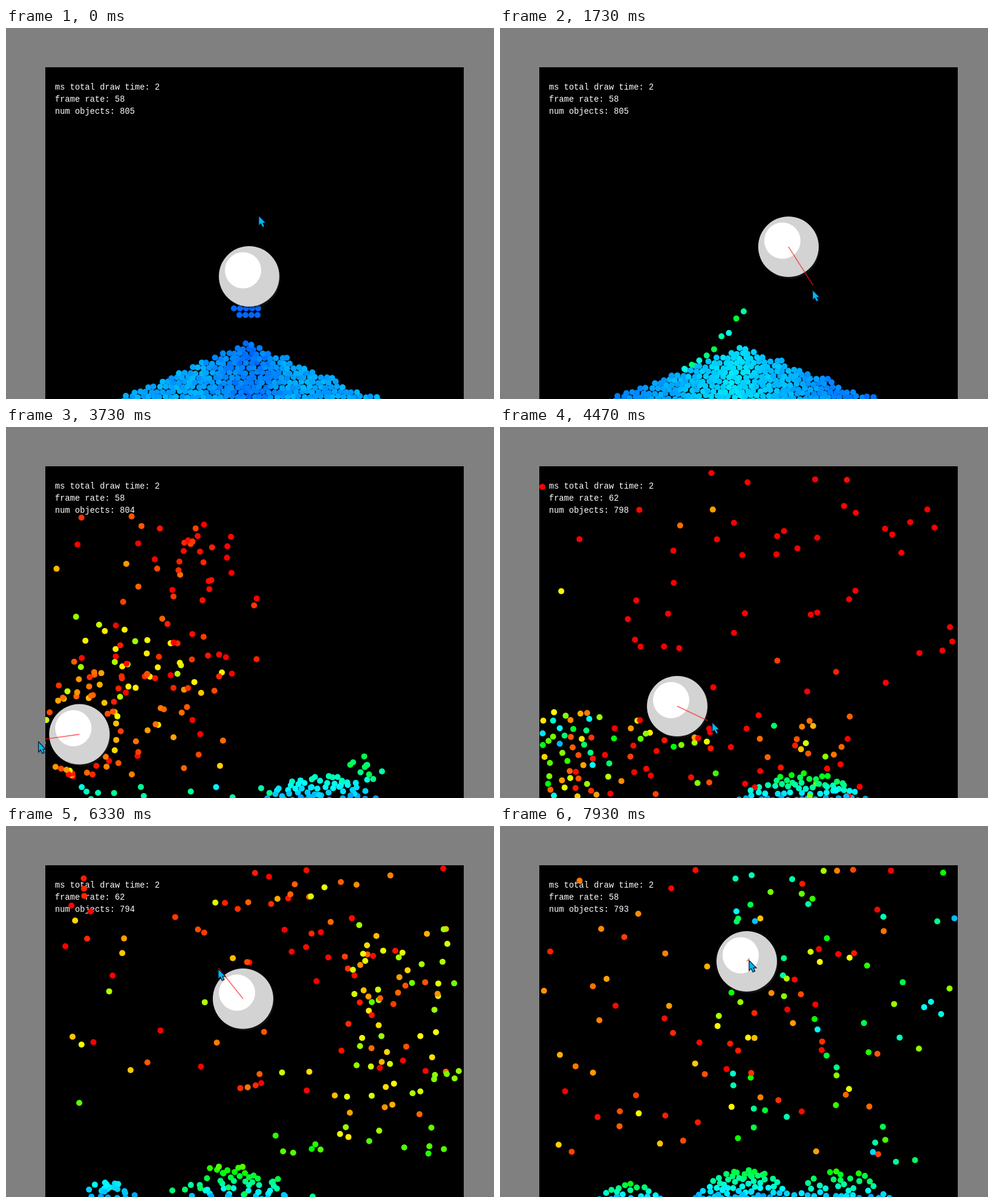
Write an HTML page with a canvas that moves like this. It is 807 by 614 pixels and loops after 8 s.

```html
<!DOCTYPE html>
<html lang="en">
<head>
<meta charset="utf-8">
<title>Particle pile</title>
<style>
  html, body { margin: 0; width: 100%; height: 100%; overflow: hidden; background: #808080; }
  #world { position: absolute; left: 65px; top: 65px; width: 692px; height: 549px; background: #000; }
  #stats { position: absolute; left: 81px; top: 89px; margin: 0; color: #fff;
           font: 13.75px/20px "Liberation Mono", monospace; }
  canvas { position: absolute; left: 0; top: 0; }
</style>
</head>
<body>
<div id="world"></div>
<pre id="stats"></pre>
<canvas id="view" width="807" height="614"></canvas>
<script>
const TICKS = 120, LOOP = 8000, COUNT = 370, DROPS = 9, GRAVITY = 1.2;
const LEFT = 70, RIGHT = 752, TOP = 70, FLOOR = 618;
const ctx = document.getElementById('view').getContext('2d');
const stats = document.getElementById('stats');

let seed = 7;
function rnd() {
  seed = (seed + 0x6D2B79F5) | 0;
  let v = Math.imul(seed ^ (seed >>> 15), 1 | seed);
  v = (v + Math.imul(v ^ (v >>> 7), 61 | v)) ^ v;
  return ((v ^ (v >>> 14)) >>> 0) / 4294967296;
}
const mix = (a, b, u) => a + (b - a) * u;
const within = (a, b) => mix(a, b, rnd());
const repeat = (n, make) => Array.from({ length: n }, (_, i) => make(i));

// Groups of dots: {x, y, h: hue, rest: lying on the floor}
function spread(n, gap, pick) {
  const dots = [];
  while (dots.length < n) {
    let dot, tries = 0;
    do dot = pick();
    while (++tries < 30 && dots.some(d => Math.hypot(d.x - dot.x, d.y - dot.y) < gap));
    dots.push(dot);
  }
  return dots;
}

const air = (n, x0, x1, y0, y1, h0, h1, skew = 1) => spread(n, 10, () => (
  { x: within(x0, x1), y: within(y0, y1), h: mix(h0, h1, rnd() ** skew), rest: false }));

const mound = (n, mid, half, height, topHue) => spread(n, 8.5, () => {
  const side = rnd() + rnd() - 1, lift = rnd() * (1 - side * side);
  return { x: mid + half * side, y: FLOOR - height * lift,
           h: mix(205, topHue, lift) + within(-6, 6), rest: true };
});

// Dots thrown up around the ball, cooling towards the right
const fan = (n, cx, cy, reach) => spread(n, 7.5, () => {
  const a = within(0.99, 1.73) * Math.PI, r = reach * Math.sqrt(within(0.04, 1));
  const x = cx + r * Math.cos(a), y = cy + r * Math.sin(a);
  return { x, y, h: Math.min(160, Math.max(0, (x - cx) * 1.9 + within(-15, 15))), rest: false };
});

const fill = dots => [...dots, ...repeat(COUNT - dots.length, () => (
  { x: within(LEFT, RIGHT), y: within(635, 690), h: 210, rest: true }))];

const slope = x => 522 + 0.42 * Math.abs(x - 400);
const cone = [];
for (let y = FLOOR, row = 0; y > 515; y -= 7.9, row++) {
  for (let x = 185 + (row % 2) * 4.6; x < 622; x += 9.2) {
    if (y < slope(x) + within(-4, 4)) continue;
    const h = 213 - 12 * Math.min(1, Math.abs(x - 400) / 80) + within(-5, 5);
    cone.push({ x: x + within(-1.5, 1.5), y: y + within(-1.5, 1.5), h, rest: true });
  }
}

// The cone slumps a little and lights up in the middle
const slump = (dot, u) => {
  const off = Math.min(1, Math.abs(dot.x - 385) / 190);
  return { ...dot, x: mix(400, dot.x, 1 + 0.02 * u), y: dot.y + 8 * u * (1 - off),
           h: mix(dot.h, 187 + 24 * off + within(-4, 4), u) };
};
const under = i => ({ x: 377 + 10 * (i % 5) + (i > 4 ? 9 : 0), y: i > 4 ? 475 : 464, h: 216 });
const bounced = i => {
  const u = i / (DROPS - 1), x = mix(305, 403, u);
  return { x, y: slope(x) - 55 * u * u + within(-5, 5), h: within(125, 178) };
};
const base = fill(cone.slice(0, COUNT - DROPS)).slice(0, COUNT - DROPS);
const start = (t, u, drop) => (
  { t, dots: [...base.map(d => slump(d, u)), ...repeat(DROPS, i => ({ rest: false, ...drop(i) }))] });

const keys = [
  start(0, 0, under),
  start(10, 0.4, i => ({ x: under(i).x, y: 542, h: 195 })),
  start(26, 1, bounced)];

// Each new place is taken by a dot that is near, with some chance
function regroup(t, ease, ...groups) {
  const from = keys[keys.length - 1].dots;
  const free = new Set(from.keys()), dots = [];
  for (const place of fill(groups.flat())) {
    let best, least = Infinity;
    for (const i of free) {
      const d = from[i];
      const cost = Math.hypot(place.x - d.x, 2 * (place.y - d.y))
        + (place.rest === d.rest ? 0 : 200) + (place.rest ? 20 : 200) * rnd();
      if (cost < least) { least = cost; best = i; }
    }
    free.delete(best);
    dots[best] = place;
  }
  keys.push({ t, ease, dots });
}

// The ball dives into the cone, then sweeps left, right and up
regroup(43, 3, mound(95, 553, 105, 52, 186), fan(190, 287, 597, 117),
  air(4, 380, 520, 450, 555, 120, 170));
regroup(52, 1, mound(70, 540, 110, 42, 175), air(160, LEFT, 300, 200, 610, 0, 40, 3));
regroup(67, 1, mound(65, 505, 115, 45, 120), air(45, LEFT, 155, 470, 614, 0, 200),
  air(50, LEFT, RIGHT, TOP, 440, 0, 60, 12), air(65, 150, 610, 475, 612, 0, 150, 3));
regroup(83, 1, mound(42, 132, 75, 24, 165), mound(60, 400, 95, 85, 60),
  air(75, 670, RIGHT, 320, 612, 0, 40, 8), air(60, LEFT, RIGHT, TOP, 520, 0, 150, 4),
  air(25, 490, RIGHT, 540, 612, 0, 60, 4));
regroup(108, 1, mound(22, 185, 65, 48, 180), mound(60, 362, 105, 52, 90),
  air(85, LEFT, RIGHT, TOP, 520, 0, 50, 4), air(65, 440, RIGHT, 80, 612, 45, 205));
regroup(119, 1, mound(70, 405, 85, 50, 130), mound(20, 215, 55, 28, 120),
  mound(36, 565, 90, 48, 110), air(70, LEFT, 650, TOP, 580, 0, 70, 2),
  air(60, 360, RIGHT, TOP, 560, 50, 205));

// tick, ball x y, pointer x y
const track = [
  [0, 402, 411, 418, 311], [14, 440, 365, 485, 325], [26, 477, 362, 517, 434],
  [35, 440, 535, 430, 600], [43, 287, 597, 250, 601], [54, 115, 520, 34, 530],
  [67, 293, 462, 351, 489], [77, 585, 490, 600, 455], [83, 563, 459, 450, 386],
  [96, 385, 275, 350, 230], [108, 424, 208, 442, 232], [119, 408, 224, 412, 223]];

const findSegment = (list, t, timeOf) => {
  let i = 0;
  while (i < list.length - 2 && timeOf(list[i + 1]) <= t) i++;
  return i;
};

// Smooth curve through the rows
function follow(t) {
  const i = findSegment(track, t, row => row[0]);
  const a = track[i], b = track[i + 1];
  const before = track[i - 1] || a, after = track[i + 2] || b;
  const span = b[0] - a[0], u = (t - a[0]) / span;
  return a.map((v, c) => {
    const m0 = (b[c] - before[c]) / (b[0] - before[0]) * span;
    const m1 = (after[c] - a[c]) / (after[0] - a[0]) * span;
    return (2 * u ** 3 - 3 * u * u + 1) * v + (u ** 3 - 2 * u * u + u) * m0
      + (3 * u * u - 2 * u ** 3) * b[c] + (u ** 3 - u * u) * m1;
  }).slice(1);
}

function disc(x, y, r, color) {
  ctx.fillStyle = color;
  ctx.beginPath();
  ctx.arc(x, y, r, 0, 2 * Math.PI);
  ctx.fill();
}

function drawDots(t, bx, by) {
  const i = findSegment(keys, t, key => key.t);
  const from = keys[i], to = keys[i + 1], span = to.t - from.t;
  const u = ((t - from.t) / span) ** (to.ease || 1);
  const rise = 0.5 * GRAVITY * span * span * u * (1 - u);
  from.dots.forEach((a, n) => {
    const b = to.dots[n];
    let x = mix(a.x, b.x, u);
    let y = mix(a.y, b.y, u) - (a.rest && b.rest ? 0 : rise);
    if (y < TOP) y = 2 * TOP - y;
    const dx = x - bx, dy = y - by, d = Math.hypot(dx, dy) || 1;
    if (t > 26 && d < 70) {
      const pushed = mix(55, 70, d / 70);
      x = bx + dx / d * pushed;
      y = by + dy / d * pushed;
    }
    disc(x, y, 5, `hsl(${mix(a.h, b.h, u)}, 100%, 50%)`);
  });
}

function drawBall(x, y) {
  disc(x + 2, y + 3, 50, 'rgba(32, 36, 40, 0.5)');
  disc(x, y, 50, '#d3d3d3');
  disc(x - 10, y - 10, 30, '#fff');
}

function drawString(x0, y0, x1, y1) {
  ctx.strokeStyle = 'rgba(255, 30, 25, 0.68)';
  ctx.lineWidth = 1.6;
  ctx.beginPath();
  ctx.moveTo(x0, y0);
  ctx.lineTo(x1, y1);
  ctx.stroke();
}

const arrow = new Path2D('M0 0V14L3 11L6 17L8.3 16L5.6 10.3H10Z');
function drawPointer(x, y) {
  ctx.save();
  ctx.translate(x + 0.5, y + 1);
  ctx.lineWidth = 2.4;
  ctx.strokeStyle = '#0a1016';
  ctx.stroke(arrow);
  ctx.fillStyle = '#00b7ff';
  ctx.fill(arrow);
  ctx.restore();
}

// The readings peak while most dots are in the air
function writeStats(t) {
  const peak = width => Math.round(2 * Math.exp(-(((t - 83) / width) ** 2)));
  const lost = Math.round(12 * (1 - Math.exp(-Math.max(0, t - 55) / 14)));
  stats.textContent = `ms total draw time: ${2 + peak(8)}\n`
    + `frame rate: ${58 + 4 * peak(15)}\nnum objects: ${805 - lost}`;
}

function draw(t) {
  const [bx, by, px, py] = follow(t);
  const [, , nextX, nextY] = follow(t + 0.1);
  writeStats(t);
  ctx.clearRect(0, 0, 807, 614);
  ctx.save();
  ctx.beginPath();
  ctx.rect(65, 65, 692, 549);
  ctx.clip();
  drawDots(t, bx, by);
  drawBall(bx, by);
  // The string's end trails the pointer
  if (t > 5) drawString(bx, by, px - 3 * (nextX - px), py - 4 - 3 * (nextY - py));
  ctx.restore();
  drawPointer(px, py);
}

const began = performance.now();
let shown = -1;
function step() {
  const time = Math.max(0, performance.now() - began) % LOOP;
  const tick = Math.min(TICKS - 1, Math.floor(time * TICKS / LOOP + 0.1));
  if (tick !== shown) draw(shown = tick);
  requestAnimationFrame(step);
}
step();
</script>
</body>
</html>
```
